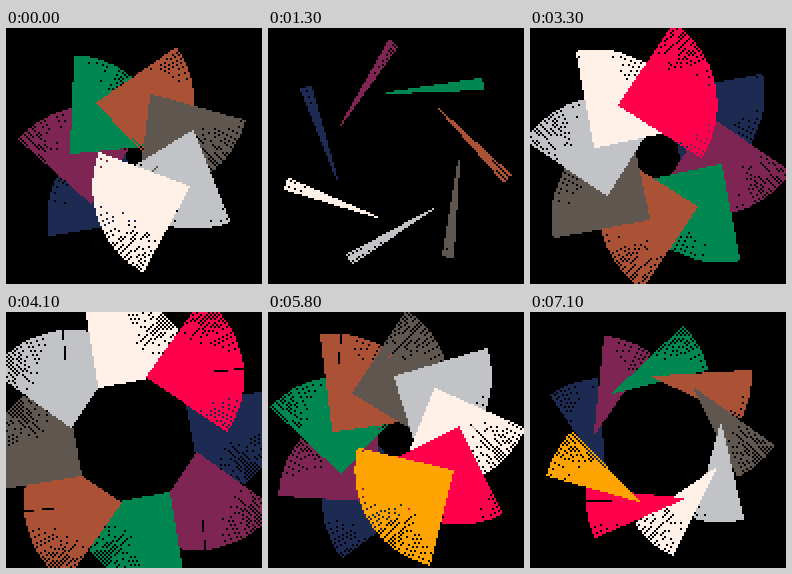
Animation, 256 px wide and 256 px high, one loop 7.2 s. Source, as an HTML page with a canvas:

```html
<!DOCTYPE html>
<html>
<head>
<meta charset="utf-8">
<style>
html, body { margin: 0; height: 100%; overflow: hidden; background: #000; }
canvas { display: block; width: 100vw; height: 100vh; image-rendering: pixelated; }
</style>
</head>
<body>
<canvas width="128" height="128"></canvas>
<script>
const ctx = document.querySelector('canvas').getContext('2d');
const COLORS = ['#1d2b53', '#7e2553', '#008751', '#ab5236', '#5f574f', '#c2c3c7', '#fff1e8', '#ff004d', '#ffa300'];
const LOOP = 7200, STEP = 100;
const RING = 32, BLADE = 48.2, RAY_GAP = 1.2;
const QUARTER = 1.545, CLOSED_AT = 1.42;
const rad = degrees => degrees * Math.PI / 180;

// Hard-edged line, one pixel per step along the longer axis
function line(x0, y0, x1, y1) {
  const dx = x1 - x0, dy = y1 - y0;
  const steps = Math.max(Math.abs(dx), Math.abs(dy));
  for (let i = 0; i <= steps; i++) {
    ctx.fillRect(Math.round(x0 + dx * i / steps), Math.round(y0 + dy * i / steps), 1, 1);
  }
}

function fan(angle, start, spread) {
  const x = 64 + RING * Math.cos(rad(angle));
  const y = 64 + RING * Math.sin(rad(angle));
  for (let ray = 0; ray <= spread; ray += RAY_GAP) {
    const a = rad(angle + start + ray);
    line(Math.floor(x), Math.floor(y),
      Math.floor(x + BLADE * Math.cos(a)), Math.floor(y + BLADE * Math.sin(a)));
  }
}

function draw(t) {
  const count = 7 + (t >= 1.6) + (t >= 4.6);
  const turn = 80.4 + 60 * t;

  // Each fan opens, swings outward, swings back and closes
  const phase = ((t - CLOSED_AT) / QUARTER + 4) % 4;
  const travel = 2 - Math.abs(phase - 2);
  const spread = 90 * Math.min(travel, 1);
  const start = 90 - 90 * Math.max(travel - 1, 0);

  ctx.fillStyle = '#000';
  ctx.fillRect(0, 0, 128, 128);
  for (let i = 0; i < count; i++) {
    ctx.fillStyle = COLORS[i];
    fan(turn + i * 360 / count, start, spread);
  }
}

let shown = -1;
function tick() {
  const step = Math.floor(performance.now() % LOOP / STEP);
  if (step !== shown) draw(step * STEP / 1000);
  shown = step;
  requestAnimationFrame(tick);
}
tick();
</script>
</body>
</html>
```
